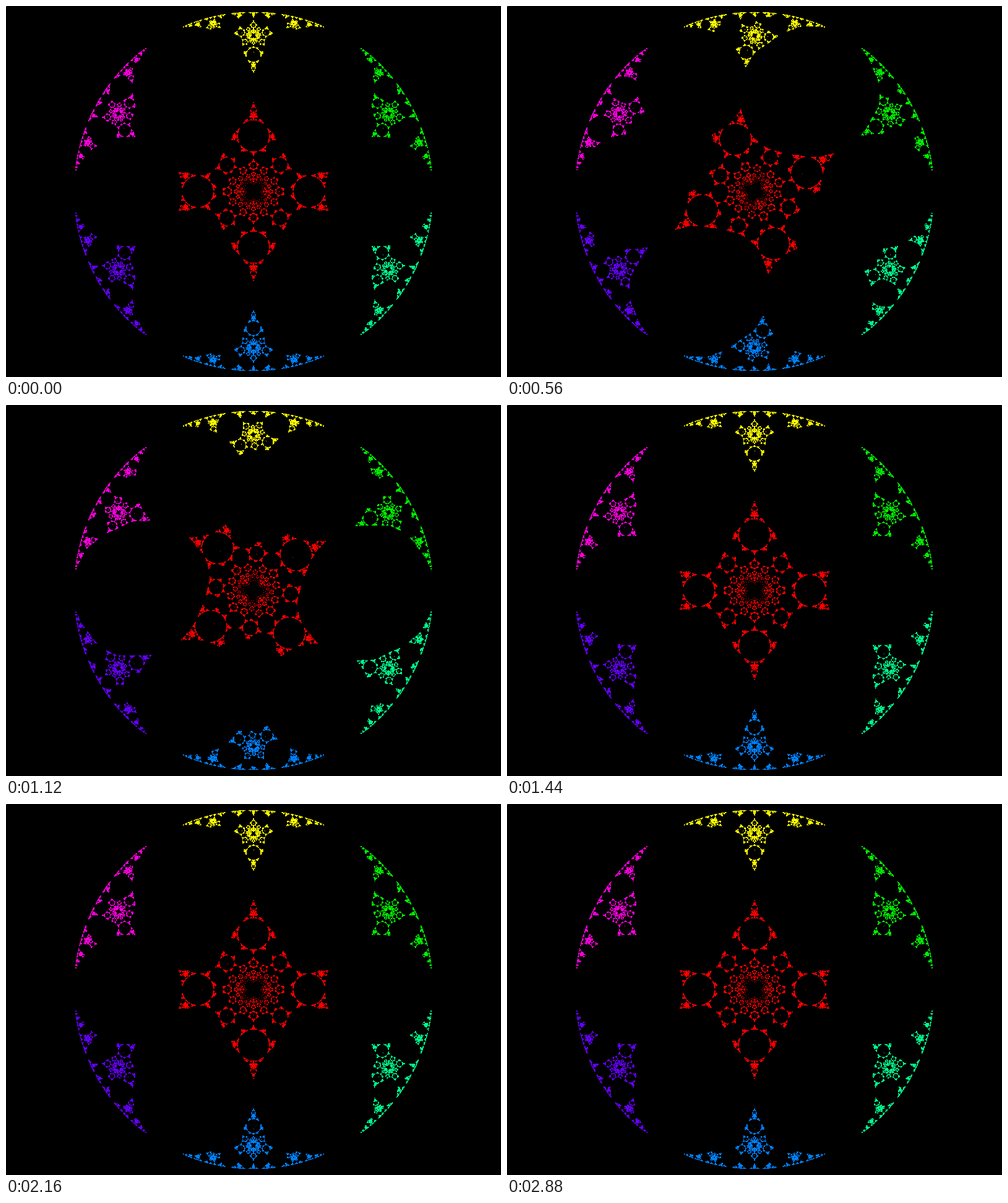
These frames come from a looping animation (800 px wide and 600 px high, 2.96 s). An HTML page with a canvas:

```html
<!DOCTYPE html>
<html lang="en">
<head>
<meta charset="utf-8">
<title>Circle inversion limit set</title>
<style>
  html, body { margin: 0; width: 100%; height: 100%; overflow: hidden; background: #000; }
  canvas { display: block; }
</style>
</head>
<body>
<canvas id="stage" width="800" height="600"></canvas>
<script>
const WIDTH = 800, HEIGHT = 600, RADIUS = 290;
const STEP_MS = 80, STEPS = 37, POSES = 9;
const INNER = 4, INNER_DISTANCE = 0.285, OUTER_DISTANCE = 1.15, MAX_DEPTH = 6;
const ctx = document.getElementById('stage').getContext('2d');

const rgb = (r, g, b) => (0xff000000 | b << 16 | g << 8 | r) >>> 0;
const BLACK = rgb(0, 0, 0), RED = rgb(255, 0, 0), GREEN = rgb(0, 240, 0);
// Clockwise from the top.
const OUTER_COLORS = [
  rgb(255, 255, 0), GREEN, rgb(0, 255, 140),
  rgb(0, 128, 255), rgb(102, 0, 255), rgb(255, 0, 221)
];

function circle(degrees, distance, radius, color) {
  const a = degrees * Math.PI / 180;
  return {
    x: WIDTH / 2 + RADIUS * distance * Math.sin(a),
    y: HEIGHT / 2 - RADIUS * distance * Math.cos(a),
    r2: (RADIUS * radius) ** 2,
    color
  };
}

// Four inner circles meet at the centre; six outer circles cross the rim at right angles.
function makeCircles(turn) {
  const outerRadius = Math.sqrt(OUTER_DISTANCE ** 2 - 1);
  const circles = [];
  for (let i = 0; i < INNER; i++) {
    circles.push(circle(turn + i * 90, INNER_DISTANCE, INNER_DISTANCE, RED));
  }
  OUTER_COLORS.forEach((color, i) => {
    circles.push(circle(i * 60, OUTER_DISTANCE, outerRadius, color));
  });
  return circles;
}

function renderPose(turn) {
  const image = ctx.createImageData(WIDTH, HEIGHT);
  const pixels = new Uint32Array(image.data.buffer).fill(BLACK);
  const circles = makeCircles(turn);

  function plot(x, y, color) {
    const px = Math.floor(x), py = Math.floor(y);
    if (px >= 0 && px < WIDTH && py >= 0 && py < HEIGHT) pixels[py * WIDTH + px] = color;
  }

  function spread(x, y, last, depth) {
    for (let i = 0; i < circles.length; i++) {
      if (i === last) continue;
      // Neighbouring inner circles are orthogonal, so one order is enough.
      if (i < last && last < INNER && (last - i) % 2) continue;
      const c = circles[i];
      const dx = x - c.x, dy = y - c.y;
      const k = c.r2 / (dx * dx + dy * dy);
      const nx = c.x + dx * k, ny = c.y + dy * k;
      plot(nx, ny, c.color);
      if (depth < MAX_DEPTH) spread(nx, ny, i, depth + 1);
    }
  }

  for (let i = 0; i < INNER; i++) {
    const { x, y, color } = circles[i];
    plot(x, y, color);
    spread(x, y, i, 1);
  }
  pixels[0] = GREEN;
  return image;
}

const poses = Array.from({ length: POSES }, (_, i) => renderPose(i * 10));
let shown = -1;

function draw() {
  const pose = Math.floor(performance.now() / STEP_MS) % STEPS % POSES;
  if (pose !== shown) ctx.putImageData(poses[shown = pose], 0, 0);
  requestAnimationFrame(draw);
}
draw();
</script>
</body>
</html>
```
